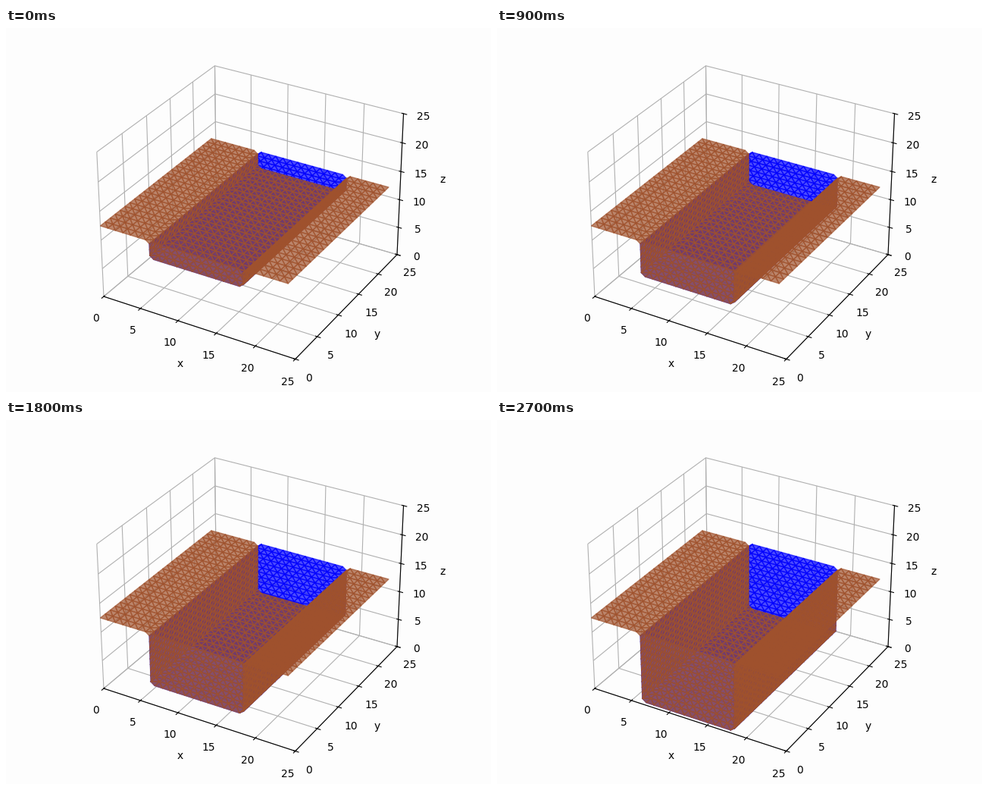
A matplotlib script for the animation above (3000 ms loop, 640 by 480 pixels).

```python
import numpy as np
import matplotlib.pyplot as plt
from matplotlib.animation import FuncAnimation
from mpl_toolkits.mplot3d.art3d import Poly3DCollection

FRAMES, INTERVAL = 10, 300
BACKGROUND = "#fdfdfd"
SIZE = 24                 # last grid index in x and y
LEFT, RIGHT = 6.5, 18.5   # trench walls
GROUND = 12.5             # ground level
FIRST_FLOOR = 9.5


def flat(start, stop, z):
    """Points one unit apart along x, both ends included."""
    step = 1 if stop >= start else -1
    return [(x, z) for x in range(start, stop + step, step)]


def trench_profile(floor):
    """Left wall, floor and right wall, with half-unit chamfers between."""
    heights = np.arange(floor + 0.5, GROUND)
    left = [(LEFT, z) for z in heights[::-1]]
    right = [(RIGHT, z) for z in heights]
    return left + flat(7, 18, floor) + right


def extrude(profile):
    """Sweep an x-z profile along y as a mesh of triangles."""
    triangles = []
    for ends in zip(profile, profile[1:]):
        (x0, z0), (x1, z1) = sorted(ends)
        for y in range(SIZE):
            a, b = (x0, y, z0), (x1, y, z1)
            c, d = (x1, y + 1, z1), (x0, y + 1, z0)
            if z0 == z1:
                triangles += [(a, b, d), (b, c, d)]
            else:
                triangles += [(a, b, c), (a, c, d)]
    return np.array(triangles, dtype=float)


def soil_mesh(floor):
    return extrude(flat(0, 6, GROUND) + trench_profile(floor)
                   + flat(19, SIZE, GROUND))


def dug_mesh(floor):
    trench = trench_profile(floor)
    return extrude(trench + flat(18, 7, GROUND) + trench[:1])


def add_mesh(triangles, color):
    rgba = (color, 0.7)
    mesh = Poly3DCollection(triangles, facecolors=[rgba], edgecolors=[rgba],
                            linewidths=1)
    ax.add_collection3d(mesh)
    return mesh


fig = plt.figure(figsize=(6.4, 4.8), dpi=100, facecolor=BACKGROUND)
ax = fig.add_axes([0, 15 / 480, 1, 450 / 480], projection="3d",
                  facecolor=BACKGROUND)
ax.set(xlim=(0, 25), ylim=(0, 25), zlim=(0, 25),
       xlabel="x", ylabel="y", zlabel="z")
for axis in (ax.xaxis, ax.yaxis, ax.zaxis):
    axis.set_pane_color((1, 1, 1, 0))
    axis.set_ticks(range(0, 26, 5))

dug = add_mesh(dug_mesh(FIRST_FLOOR), "blue")
soil = add_mesh(soil_mesh(FIRST_FLOOR), "sienna")


def update(frame):
    floor = FIRST_FLOOR - frame
    dug.set_verts(dug_mesh(floor))
    soil.set_verts(soil_mesh(floor))
    return dug, soil


anim = FuncAnimation(fig, update, frames=FRAMES, interval=INTERVAL,
                     repeat=True, repeat_delay=0)
plt.show()
```
